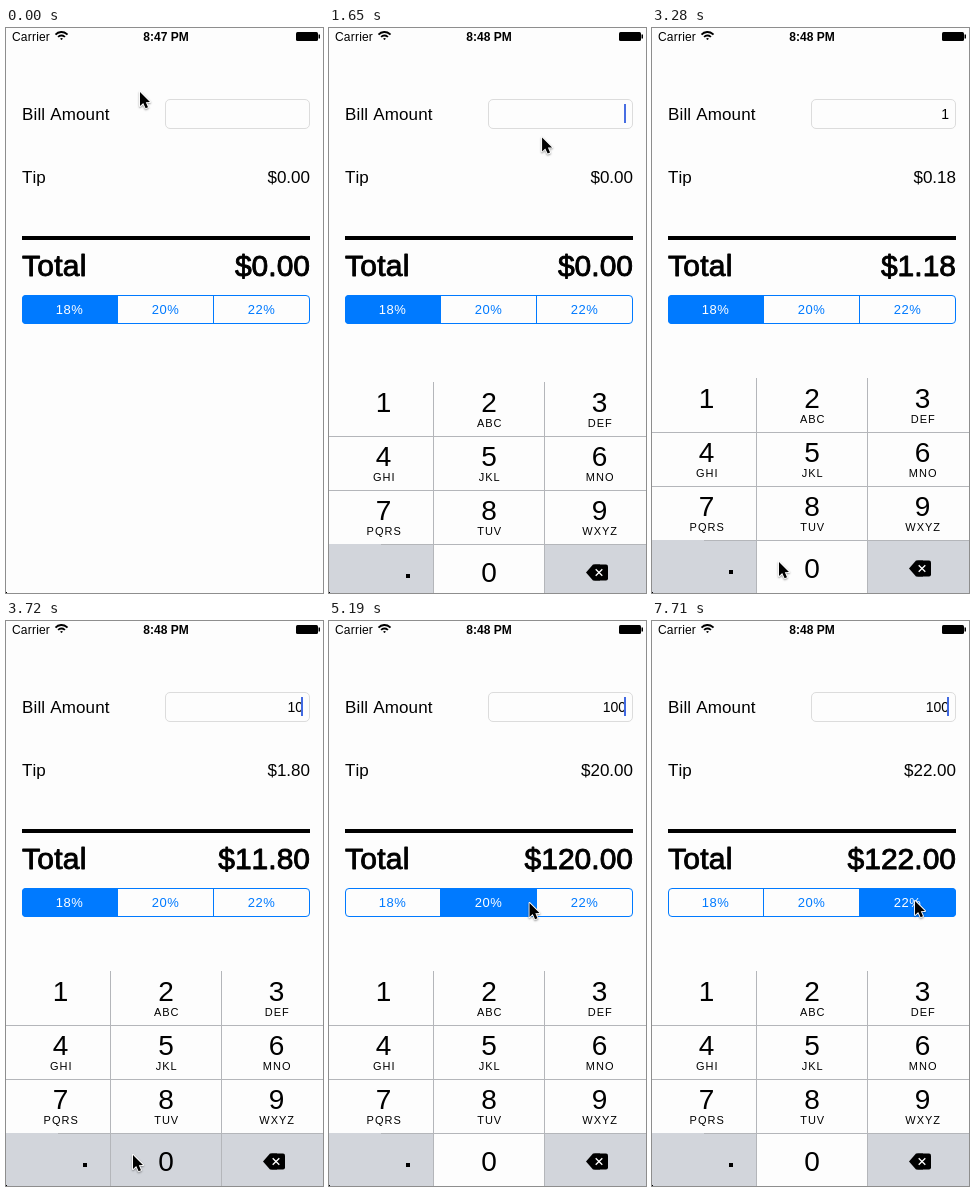
An HTML page with a canvas for the animation above (8000 ms loop, 317x565 px).

```html
<!DOCTYPE html>
<html lang="en">
<head>
<meta charset="utf-8">
<title>Tip calculator</title>
<style>
  html, body { margin: 0; width: 100%; height: 100%; overflow: hidden; background: #fdfdfd; }
  canvas { display: block; }
</style>
</head>
<body>
<canvas id="stage" width="317" height="565"></canvas>
<script>
const ctx = document.getElementById('stage').getContext('2d');
const WIDTH = 317, HEIGHT = 565, LOOP = 8000;
const STEP = 148.3, LAST_STEP = 52; // the screen refreshes once per step
const PAGE = '#fdfdfd', BLUE = '#007aff', GREY = '#d2d5db', LINE = '#b4b6ba';
const FAMILY = '"Liberation Sans", Arial, sans-serif';

// Pointer stops; arrive, leave and taps are in steps.
const STOPS = [
  { x: 134, y: 64, arrive: 0, leave: 0, taps: [] },
  { x: 225, y: 88, arrive: 3, leave: 10, taps: [8.2], key: '' },
  { x: 64, y: 377, arrive: 16, leave: 18, taps: [18], key: '1' },
  { x: 127, y: 534, arrive: 22, leave: 26, taps: [24, 26], key: '0' },
  { x: 138, y: 284, arrive: 31, leave: 34, taps: [34], segment: 1 },
  { x: 263, y: 280, arrive: 36, leave: LAST_STEP, taps: [39], segment: 2 }
];
const TAPS = STOPS.flatMap(({ taps, key, segment }) => taps.map(step => ({ step, key, segment })));
const FOCUS_STEP = TAPS[0].step;

const RATES = [18, 20, 22];
const SEGMENT_WIDTH = 96;
const KEY_HEIGHT = 54, KEY_PITCH = 111, KEY_CENTERS = [54.5, 160, 270.5];
const LETTERS = ['', 'ABC', 'DEF', 'GHI', 'JKL', 'MNO', 'PQRS', 'TUV', 'WXYZ'];

const clamp = v => Math.max(0, Math.min(1, v));
const ease = k => k * k * (3 - 2 * k);

function stateAt(step) {
  const done = TAPS.filter(tap => tap.step <= step);
  const typed = done.filter(tap => tap.key !== undefined);
  return {
    bill: typed.map(tap => tap.key).join(''),
    selected: done.at(-1)?.segment ?? 0,
    lastKeyStep: typed.at(-1)?.step,
    touch: TAPS.find(tap => tap.step > step && tap.step - 1 <= step) ?? {}
  };
}

function pointerAt(step) {
  const i = STOPS.findLastIndex(stop => stop.arrive <= step);
  const from = STOPS[i], to = STOPS[i + 1] ?? from;
  const k = ease(clamp((step - from.leave) / (to.arrive - from.leave || 1)));
  return [from.x + (to.x - from.x) * k, from.y + (to.y - from.y) * k];
}

// Critically damped spring that starts when the field is tapped.
function keyboardTop(step) {
  const s = 2.09 * Math.max(0, step - FOCUS_STEP);
  return Math.round(350 + 215 * (1 + s) * Math.exp(-s));
}

// The blink restarts with every key.
function caretAlpha(step, lastKeyStep) {
  if (lastKeyStep === undefined) return 0;
  const phase = (step - lastKeyStep) * STEP % 950;
  return 1 - clamp((phase - 410) / 140) + clamp((phase - 745) / 140);
}

function rect(x, y, w, h, color) {
  ctx.fillStyle = color;
  ctx.fillRect(x, y, w, h);
}

function text(str, x, y, size, { align = 'left', color = '#000', weight = '', spacing = 0, kerning = 'none', stroke = 0 } = {}) {
  ctx.font = `${weight} ${size}px ${FAMILY}`;
  ctx.textAlign = align;
  ctx.letterSpacing = spacing + 'px';
  ctx.fontKerning = kerning;
  ctx.fillStyle = ctx.strokeStyle = color;
  ctx.fillText(str, x, y);
  if (stroke) {
    ctx.lineWidth = stroke;
    ctx.lineJoin = 'round';
    ctx.strokeText(str, x, y);
  }
}

function roundBox(x, y, w, h, r) {
  ctx.beginPath();
  ctx.roundRect(x, y, w, h, r);
}

function outline(x, y, w, h, r, color) {
  ctx.strokeStyle = color;
  ctx.lineWidth = 1;
  roundBox(x + 0.5, y + 0.5, w - 1, h - 1, r);
  ctx.stroke();
}

function polygon(points) {
  ctx.beginPath();
  points.forEach(([x, y]) => ctx.lineTo(x, y));
  ctx.closePath();
}

function drawStatusBar(step) {
  text('Carrier', 6, 12.5, 12, { spacing: 0.2 });
  text(step < 1 ? '8:47 PM' : '8:48 PM', 160, 12.5, 12, { align: 'center', weight: 'bold' });
  ctx.strokeStyle = '#000';
  ctx.lineWidth = 1.8;
  for (let r = 1; r < 9; r += 3.5) {
    ctx.beginPath();
    ctx.arc(55.5, 12, r, -Math.PI * 0.77, -Math.PI * 0.23);
    ctx.stroke();
  }
  ctx.fillStyle = '#000';
  roundBox(290, 4, 22, 9, 1.5);
  ctx.fill();
  rect(312.5, 6.5, 1.5, 4, '#000');
}

function drawForm(step, { bill, selected, lastKeyStep, touch }) {
  const tip = bill * RATES[selected] / 100;
  const money = amount => '$' + amount.toFixed(2);

  text('Bill Amount', 16, 92, 17, { spacing: 0.15 });
  outline(159, 71, 145, 30, 4.5, '#dcdcdc');
  text(bill, 297, 91, 14, { align: 'right' });
  ctx.globalAlpha = caretAlpha(step, lastKeyStep);
  rect(295, 76, 2, 19, '#4169e1');
  ctx.globalAlpha = 1;

  text('Tip', 16, 155, 17);
  text(money(tip), 304, 155, 17, { align: 'right' });
  rect(16, 208, 288, 4, '#000');
  text('Total', 16, 248, 30, { kerning: 'normal', spacing: 0.25, stroke: 0.9 });
  text(money(+bill + tip), 304, 248, 30, { align: 'right', stroke: 0.9 });
  drawSegments(selected, touch.segment);
}

function drawSegments(selected, touched) {
  ctx.save();
  roundBox(16, 267, 288, 29, 4);
  ctx.clip();
  RATES.forEach((rate, i) => {
    const x = 16 + i * SEGMENT_WIDTH;
    if (i === selected) rect(x, 267, SEGMENT_WIDTH, 29, BLUE);
    else if (i === touched) rect(x, 267, SEGMENT_WIDTH, 29, '#d6e9ff');
    if (i) rect(x - 1, 267, 1, 29, BLUE);
    text(rate + '%', x + SEGMENT_WIDTH / 2 - 0.5, 286, 13, {
      align: 'center', spacing: 0.5, color: i === selected ? '#fff' : BLUE
    });
  });
  ctx.restore();
  outline(16, 267, 288, 29, 3.5, BLUE);
}

function drawKeyboard(top, pressed) {
  ctx.save();
  ctx.translate(0, top);
  rect(0, 0, WIDTH, 4 * KEY_HEIGHT, PAGE);

  for (let i = 0; i < 12; i++) {
    const col = i % 3, row = Math.floor(i / 3);
    const left = col * KEY_PITCH - 6, y = row * KEY_HEIGHT, x = KEY_CENTERS[col];
    const label = i < 9 ? String(i + 1) : ['', '0', ''][col];
    if (!label || label === pressed) rect(left, y, KEY_PITCH, KEY_HEIGHT, GREY);
    text(label, x, y + (row < 3 ? 30 : 38), 28, { align: 'center' });
    text(LETTERS[i] ?? '', x + 0.7, y + 45, 11, { align: 'center', spacing: 1 });
    if (row) rect(i === 9 ? 52 : left, y, KEY_PITCH, 1, LINE);
    if (col) rect(left - 1, y, 1, KEY_HEIGHT, LINE);
  }
  rect(77, 192, 4, 4, '#000');
  drawBackspace(257, 190.5);
  ctx.restore();
}

function drawBackspace(x, y) {
  ctx.save();
  ctx.translate(x, y);
  ctx.fillStyle = '#000';
  polygon([[0, 0], [7, -8], [14, -8], [14, 8], [7, 8]]);
  ctx.fill();
  roundBox(7, -8, 15, 16, 2);
  ctx.fill();
  ctx.strokeStyle = '#fff';
  ctx.lineWidth = 1.3;
  ctx.beginPath();
  for (const d of [-3.3, 3.3]) {
    ctx.moveTo(13 - d, -3.3);
    ctx.lineTo(13 + d, 3.3);
  }
  ctx.stroke();
  ctx.restore();
}

function drawPointer([x, y]) {
  ctx.save();
  ctx.translate(x, y);
  polygon([[0, 0], [0, 14], [3.2, 11], [5.6, 16.2], [8, 15.2], [5.8, 10.2], [10, 10]]);
  ctx.shadowColor = 'rgba(0,0,0,.4)';
  ctx.shadowBlur = 2;
  ctx.shadowOffsetY = 1;
  ctx.strokeStyle = '#fff';
  ctx.lineWidth = 1.8;
  ctx.stroke();
  ctx.shadowColor = 'transparent';
  ctx.fillStyle = '#000';
  ctx.fill();
  ctx.restore();
}

function render(time) {
  const step = Math.min(LAST_STEP, Math.floor((time % LOOP + 3) / STEP));
  const state = stateAt(step);
  rect(0, 0, WIDTH, HEIGHT, PAGE);
  drawStatusBar(step);
  drawForm(step, state);
  drawKeyboard(keyboardTop(step), state.touch.key);
  rect(0, HEIGHT - 1, 1, 1, '#000');
  drawPointer(pointerAt(step));
}

let start;
function tick(now) {
  start ??= now;
  render(now - start);
  requestAnimationFrame(tick);
}
render(0);
requestAnimationFrame(tick);
</script>
</body>
</html>
```
